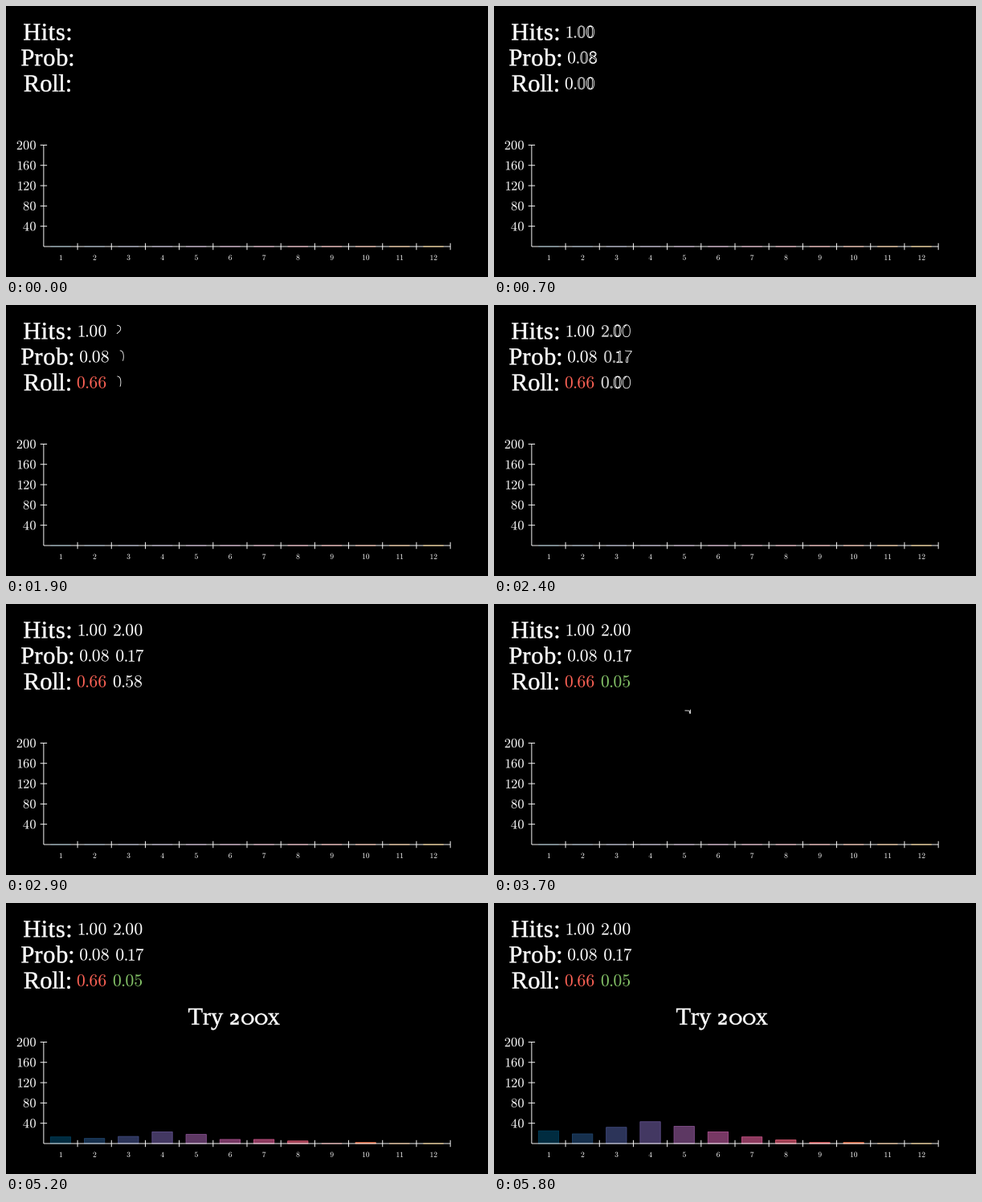
Recreate the animation shown at these times as a matplotlib script. Size 600 by 338 pixels, loop 6100 ms.

```python
import random

import matplotlib.pyplot as plt
import numpy as np
from matplotlib.animation import FuncAnimation
from matplotlib.colors import to_rgb
from matplotlib.patches import PathPatch, Rectangle
from matplotlib.path import Path
from matplotlib.textpath import TextPath

plt.rcParams["mathtext.fontset"] = "cm"

W, H, DPI = 600, 338, 100
UNIT = W / (128 / 9)          # pixels per scene unit
PX = 72 / DPI                 # points per pixel
THIN = 0.02 * UNIT
EPS = 1e-6
WHITE, RED, GREEN = "#ffffff", "#fc6255", "#83c167"

fig = plt.figure(figsize=(W / DPI, H / DPI), dpi=DPI, facecolor="black")
ax = fig.add_axes([0, 0, 1, 1])
ax.set_xlim(0, W)
ax.set_ylim(H, 0)
ax.axis("off")


# ---- glyph outlines -------------------------------------------------------

outlines = {}


def outline(char, font, weight="normal"):
    """Contours for a 1 px em, y down, clockwise from the top."""
    key = char, font, weight
    if key not in outlines:
        if font == "math":
            shape = TextPath((0, 0), r"$\mathrm{%s}$" % char, size=200)
        else:
            shape = TextPath((0, 0), char, size=200,
                             prop={"family": font, "weight": weight})
        polys = Path(shape.vertices, shape.codes).to_polygons()
        polys = [np.array(p) / [200, -200] for p in polys if len(p) > 3]
        polys.sort(key=lambda p: -abs(area(p)))
        if area(polys[0]) < 0:
            polys = [p[::-1] for p in polys]
        outlines[key] = [from_top(p) for p in polys]
    return outlines[key]


def area(p):
    x, y = p[:, 0], p[:, 1]
    return np.sum(x[:-1] * y[1:] - x[1:] * y[:-1]) / 2


def from_top(p):
    ring = p[:-1]
    ring = np.roll(ring, -np.argmin(ring[:, 1] - 0.02 * ring[:, 0]), axis=0)
    return np.vstack([ring, ring[:1]])


def bounds(contours):
    pts = np.vstack(contours)
    return pts.min(axis=0), pts.max(axis=0)


def full_path(contours):
    return Path.make_compound_path(*[Path(c, closed=True) for c in contours])


def partial_path(contours, part):
    steps = [np.hypot(*np.diff(c, axis=0).T) for c in contours]
    left = part * sum(s.sum() for s in steps)
    drawn = []
    for c, s in zip(contours, steps):
        if left <= 0:
            break
        dist = np.concatenate([[0], np.cumsum(s)])
        cut = min(left, dist[-1])
        end = [np.interp(cut, dist, c[:, 0]), np.interp(cut, dist, c[:, 1])]
        drawn.append(Path(np.vstack([c[dist < cut], end])))
        left -= dist[-1]
    return Path.make_compound_path(*drawn)


class Glyph:
    def __init__(self, weight):
        self.weight = weight
        self.patch = PathPatch(Path([(0, 0), (0, 0)]), snap=False, zorder=3)
        ax.add_patch(self.patch)

    def draw(self, contours, progress=1.0, color=WHITE):
        """First half traces the border, second half fades the fill in."""
        self.patch.set_visible(progress > 0)
        if progress <= 0:
            return
        rgb = to_rgb(color)
        if progress < 0.5:
            self.patch.set_path(partial_path(contours, 2 * progress))
            fill, width = 0, THIN
        else:
            self.patch.set_path(full_path(contours))
            fill = 2 * progress - 1
            width = THIN + (self.weight - THIN) * fill
        self.patch.set_facecolor((*rgb, fill))
        self.patch.set_edgecolor((*rgb, 1 if width > 0 else 0))
        self.patch.set_linewidth(width * PX)


class Writing:
    """A row of glyphs that can be written one after another."""

    def __init__(self, count, weight=0):
        self.glyphs = [Glyph(weight) for _ in range(count)]

    def draw(self, shapes, alpha=1.0, color=WHITE, lag=0.2):
        head = np.clip(alpha, 0, 1) * (1 + lag * (len(shapes) - 1))
        for i, (glyph, shape) in enumerate(zip(self.glyphs, shapes)):
            part = np.clip(head - lag * i, 0, 1)
            glyph.draw(shape, 1.0 if part > 1 - EPS else part, color)


# ---- text layout ----------------------------------------------------------

def number_shapes(text, em, buff, x, y, align="left"):
    """Digits set ink to ink, on a common bottom, centred on y."""
    parts = [[c * em for c in outline(ch, "math")] for ch in text]
    boxes = [bounds(p) for p in parts]
    tall = max(hi[1] - lo[1] for lo, hi in boxes)
    width = sum(hi[0] - lo[0] for lo, hi in boxes) + buff * (len(text) - 1)
    pen = x - width if align == "right" else x
    shapes = []
    for part, (lo, hi) in zip(parts, boxes):
        move = np.array([pen - lo[0], y + tall / 2 - hi[1]])
        shapes.append([c + move for c in part])
        pen += hi[0] - lo[0] + buff
    return shapes


SERIF_EM, SERIF_SIZE, SERIF_WEIGHT = 28.2, 30.5, 0.4
PITCH = {"H": .815, "i": .293, "t": .346, "s": .432, ":": .313, "P": .585,
         "r": .4, "o": .539, "b": .55, "R": .702, "l": .286, "T": .618,
         "y": .493, " ": .241, "2": .559, "0": .6, "x": .504}


def ellipse(rx, ry, turn):
    a = turn * np.linspace(0, 2 * np.pi, 61) - np.pi / 2
    return np.column_stack([rx * np.cos(a), ry * np.sin(a) - 6.8])


def serif_glyph(ch):
    """Figures are old-style: they stand at x-height."""
    if ch == "0":
        return [ellipse(7.6, 7, 1), ellipse(5.1, 5.8, -1)]
    if ch == "2":
        return [c * 18.5 for c in outline(ch, "DejaVu Serif", "bold")]
    return [c * SERIF_SIZE for c in outline(ch, "Liberation Serif")]


def serif_shapes(text, center, baseline):
    shapes, pen = [], 0
    for ch in text:
        cell = PITCH[ch] * SERIF_EM
        if ch != " ":
            part = serif_glyph(ch)
            lo, hi = bounds(part)
            move = np.array([pen + (cell - lo[0] - hi[0]) / 2, baseline])
            shapes.append([c + move for c in part])
        pen += cell
    left = bounds(shapes[0])[0][0]
    right = bounds(shapes[-1])[1][0]
    shift = np.array([center - (left + right) / 2, 0])
    return [[c + shift for c in part] for part in shapes]


def put(shapes, weight=0):
    Writing(len(shapes), weight).draw(shapes)


# ---- chart ----------------------------------------------------------------

X0, Y0 = W / 2 - 6 * UNIT, 300.0
TICK = 0.1 * UNIT
PER_COUNT = 3 * UNIT / 200
COUNTS = [25, 19, 32, 43, 34, 23, 13, 7, 2, 2, 0, 0]


def line(xs, ys):
    ax.plot(xs, ys, color=WHITE, lw=0.95 * PX, solid_capstyle="butt",
            snap=False, zorder=2)


line([X0, X0 + 12 * UNIT], [Y0, Y0])
line([X0, X0], [Y0, Y0 - 3 * UNIT])
for k in range(1, 13):
    x = X0 + k * UNIT
    line([x, x], [Y0 - TICK, Y0 + TICK])
    name = TextPath((0, 0), "$%d$" % k, size=9.4)
    pts = name.vertices * [1, -1]
    mid = (pts.min(axis=0) + pts.max(axis=0)) / 2
    ax.add_patch(PathPatch(Path(pts - mid + [x - UNIT / 2, 313.7], name.codes),
                           fc=WHITE, lw=0, snap=False, zorder=3))
for value in range(40, 201, 40):
    y = Y0 - value * PER_COUNT
    line([X0 - TICK, X0 + TICK], [y, y])
    put(number_shapes(str(value), 16.3, 0.036 * UNIT, 36.9, y, "right"))

stops = np.array([to_rgb(c) for c in
                  ("#003f5c", "#58508d", "#bc5090", "#ff6361", "#ffa600")])
bars = []
for k in range(12):
    rgb = [np.interp(4 * k / 11, range(5), stops[:, j]) for j in range(3)]
    bar = Rectangle((X0 + (k + 0.2) * UNIT, Y0), 0.6 * UNIT, 0,
                    fc=(*rgb, 0.7), ec=(*rgb, 1), lw=THIN * PX,
                    joinstyle="miter", snap=False, zorder=1)
    bars.append(ax.add_patch(bar))

LAST = [2, 5, 7]
tries = [k for k, n in enumerate(COUNTS) for _ in range(n - (k in LAST))]
random.Random(12).shuffle(tries)
tries += LAST


# ---- labels and numbers ---------------------------------------------------

ROWS = (32.2, 64.2, 96.4)
for word, y in zip(("Hits:", "Prob:", "Roll:"), ROWS):
    put(serif_shapes(word, 51.2, y + 10.1), SERIF_WEIGHT)

TRY = serif_shapes("Try 200x", 283.8, 151.6)
title = Writing(len(TRY), SERIF_WEIGHT)

# start, texts above the roll, left edges, rolled values, final colour
ROUNDS = [
    (0, ("1.00", "0.08"), (90.6, 92.1, 88.8),
     (0.00, 0.37, 0.91, 0.14, 0.73, 0.66), RED),
    (11 / 6, ("2.00", "0.17"), (134.1, 137.2, 133.8),
     (0.84, 0.58, 0.31, 0.92, 0.47, 0.05), GREEN),
]
cells = [[Writing(4) for _ in ROWS] for _ in ROUNDS]
TRY_START, BARS_START, BARS_TIME = 11 / 3, 14 / 3, 1.05


def rolled(age, values):
    if age < 1:
        return 0.0
    return values[min(int((age - 1) * 15 + EPS), len(values) - 1)]


def update(i):
    t = i / 10 + EPS
    for (start, texts, lefts, values, final), row in zip(ROUNDS, cells):
        age = t - start
        color = final if age >= 5 / 3 else WHITE
        texts = (*texts, "%.2f" % rolled(age, values))
        for cell, text, x, y, c in zip(row, texts, lefts, ROWS,
                                       (WHITE, WHITE, color)):
            shapes = number_shapes(text, 21.6, 0.048 * UNIT, x, y)
            cell.draw(shapes, age if age > 2 * EPS else 0, c)
    title.draw(TRY, t - TRY_START)

    done = int(np.clip((t - BARS_START) / BARS_TIME, 0, 1) * len(tries))
    counts = np.bincount(np.array(tries[:done], dtype=int), minlength=12)
    for bar, n in zip(bars, counts):
        bar.set_y(Y0 - n * PER_COUNT)
        bar.set_height(n * PER_COUNT)
    return []


anim = FuncAnimation(fig, update, frames=61, interval=100, repeat=True,
                     repeat_delay=0, init_func=lambda: update(0), blit=False)
plt.show()
```
